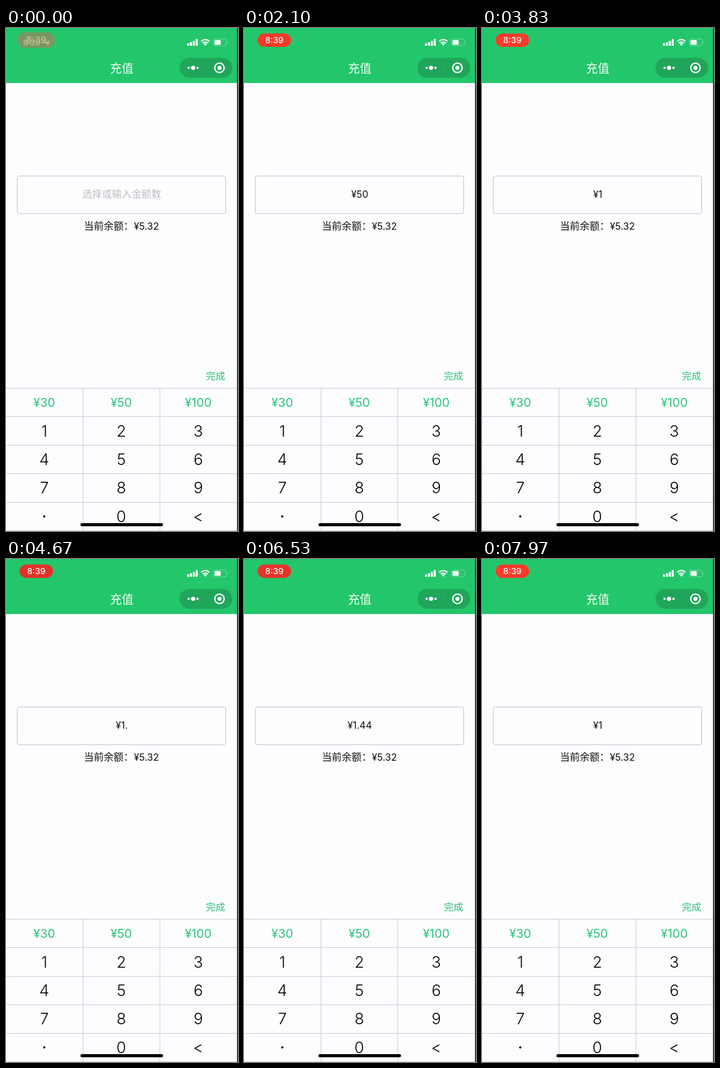
Recreate the animation shown at these times as an HTML page. Size 444 px wide and 960 px high, loop 8 s.

```html
<!DOCTYPE html>
<html lang="zh-CN">
<head>
<meta charset="utf-8">
<style>
  html, body { margin: 0; width: 100%; height: 100%; overflow: hidden; background: #fdfdff; }
  svg { display: block; width: 444px; height: 960px; }
  text { font-family: Inter, "Noto Sans CJK SC", "Noto Sans CJK", sans-serif; text-anchor: middle; }
  .key { font-size: 30px; font-weight: 300; fill: #08080a; }
  .price { font-size: 23px; fill: #2dc37a; }
  .cjk { font-family: "Noto Sans CJK SC", "Noto Sans CJK", sans-serif; }
  .line { stroke: #c6c2d2; fill: none; shape-rendering: crispEdges; }
</style>
</head>
<body>
<svg viewBox="0 0 444 960">
  <rect width="444" height="960" fill="#fdfdff"/>
  <rect width="442" height="105" fill="#23c66a"/>

  <rect id="pill"/>
  <text id="clock" x="58" font-weight="500">8:39</text>
  <g id="oldClock" fill="#c6c394">
    <text x="49" y="33" font-size="15" font-weight="500">8:39</text>
    <path d="M74 28l10-4-4 10-1.5-4.500z"/>
  </g>

  <g fill="#f4fff8">
    <rect x="346.500" y="29" width="4" height="5" rx="1"/>
    <rect x="352" y="27" width="4" height="7" rx="1"/>
    <rect x="357.500" y="24.500" width="4" height="9.500" rx="1"/>
    <rect x="363" y="21" width="4" height="13" rx="1"/>
    <path d="M381.500 34l-3-3.500q3-2.500 6 0z"/>
    <g fill="none" stroke="#f4fff8" stroke-width="2.400">
      <path d="M373.500 25.500q8-7 16 0M376.500 29q5-4.200 10 0"/>
    </g>
    <rect x="399" y="23" width="12" height="9" rx="1.500"/>
    <rect x="397" y="21" width="25" height="13" rx="3.500" fill="none" stroke="#7fdda9"/>
    <path d="M423.500 25.500q2 2 0 4z" fill="#7fdda9"/>
    <text class="cjk" x="221.500" y="85" font-size="22.500" font-weight="500">充值</text>
  </g>

  <rect x="332" y="57" width="101" height="38" rx="19" fill="#1fa65a"/>
  <path d="M382.500 66v20" stroke="#26b066"/>
  <g fill="#fff">
    <circle cx="349.500" cy="76" r="2.300"/>
    <circle cx="358" cy="76" r="4"/>
    <circle cx="366.500" cy="76" r="2.300"/>
    <circle cx="408.500" cy="76" r="4"/>
    <circle cx="408.500" cy="76" r="9" fill="none" stroke="#fff" stroke-width="2.600"/>
  </g>

  <rect x="21.500" y="282.500" width="399" height="72" rx="4" fill="none" stroke="#b9b5c4"/>
  <text id="amount" x="221.500"/>
  <text class="cjk" x="149" y="385" font-size="19" fill="#101012" style="text-anchor:start">当前余额：</text>
  <text x="268.700" y="384.500" font-size="18.400" fill="#101012">¥5.32</text>
  <text class="cjk" x="401" y="671" font-size="18.700" fill="#30c07c">完成</text>

  <g id="keypad"></g>
  <rect x="142.500" y="945" width="158" height="6" rx="3"/>
  <rect x="442" width="2" height="960" fill="#075a0c"/>
</svg>
<script>
const $ = id => document.getElementById(id);
const set = (el, attrs) => Object.entries(attrs).forEach(([k, v]) => el.setAttribute(k, v));
const mix = (a, b, k) => a.map((v, i) => v + (b[i] - v) * k);
const rgb = c => `rgb(${c.map(Math.round)})`;

const ROW = 54.4, TOP = 687.5;
const labels = ['¥30', '¥50', '¥100', '1', '2', '3', '4', '5', '6', '7', '8', '9', '·', '0', '<'];
let keypad = `<path class="line" d="M147.500 ${TOP}V960M294.500 ${TOP}V960`;
for (let row = 0; row < 6; row++) keypad += `M0 ${Math.floor(TOP + row * ROW) + 0.5}H442`;
keypad += '"/>';
labels.forEach((label, i) => {
  const x = 73.3 + (i % 3) * 147.3;
  const y = 714.8 + Math.floor(i / 3) * 54.35;
  keypad += label === '·'
    ? `<circle cx="${x}" cy="${y}" r="2.100"/>`
    : `<text class="${i < 3 ? 'price' : 'key'}" x="${x}" y="${y + (i < 3 ? 8.4 : 10.6)}">${label}</text>`;
});
$('keypad').innerHTML = keypad;

// Displayed amount from each start time in ms
const entries = [
  [0, ''], [700, '¥30'], [1650, '¥50'], [2550, '¥100'], [3450, '¥1'],
  [4250, '¥1.'], [4700, '¥1.4'], [5100, '¥1.44'],
  [6850, '¥1.4'], [7200, '¥1.'], [7550, '¥1']
];

function draw() {
  const t = performance.now() % 8000;

  // The recording badge settles in, then pulses every two seconds
  const intro = Math.min(t / 350, 1);
  const grow = 1 - intro;
  const dim = (1 + Math.cos((t - 800) * Math.PI / 1000)) / 2;
  const red = mix([255, 59, 43], [226, 49, 40], dim);
  set($('pill'), {
    x: 26 - 4 * grow, y: 10.5 - 2 * grow,
    width: 64 + 8 * grow, height: 25.5 + 4 * grow, rx: 12.75 + 2 * grow,
    fill: rgb(mix([122, 150, 98], red, intro))
  });
  set($('clock'), {
    y: 29 + 0.5 * grow, 'font-size': 16 + 1.5 * grow,
    fill: rgb(mix([200, 196, 146], [255, 250, 248], intro))
  });
  set($('oldClock'), { opacity: grow });

  const value = entries.findLast(([start]) => t >= start)[1];
  $('amount').textContent = value || '选择或输入金额数';
  set($('amount'), value
    ? { y: 324.2, 'font-size': 18.4, fill: '#141416', class: '' }
    : { y: 323.5, 'font-size': 18.9, fill: '#bfbcc2', class: 'cjk' });
  requestAnimationFrame(draw);
}
draw();
</script>
</body>
</html>
```
